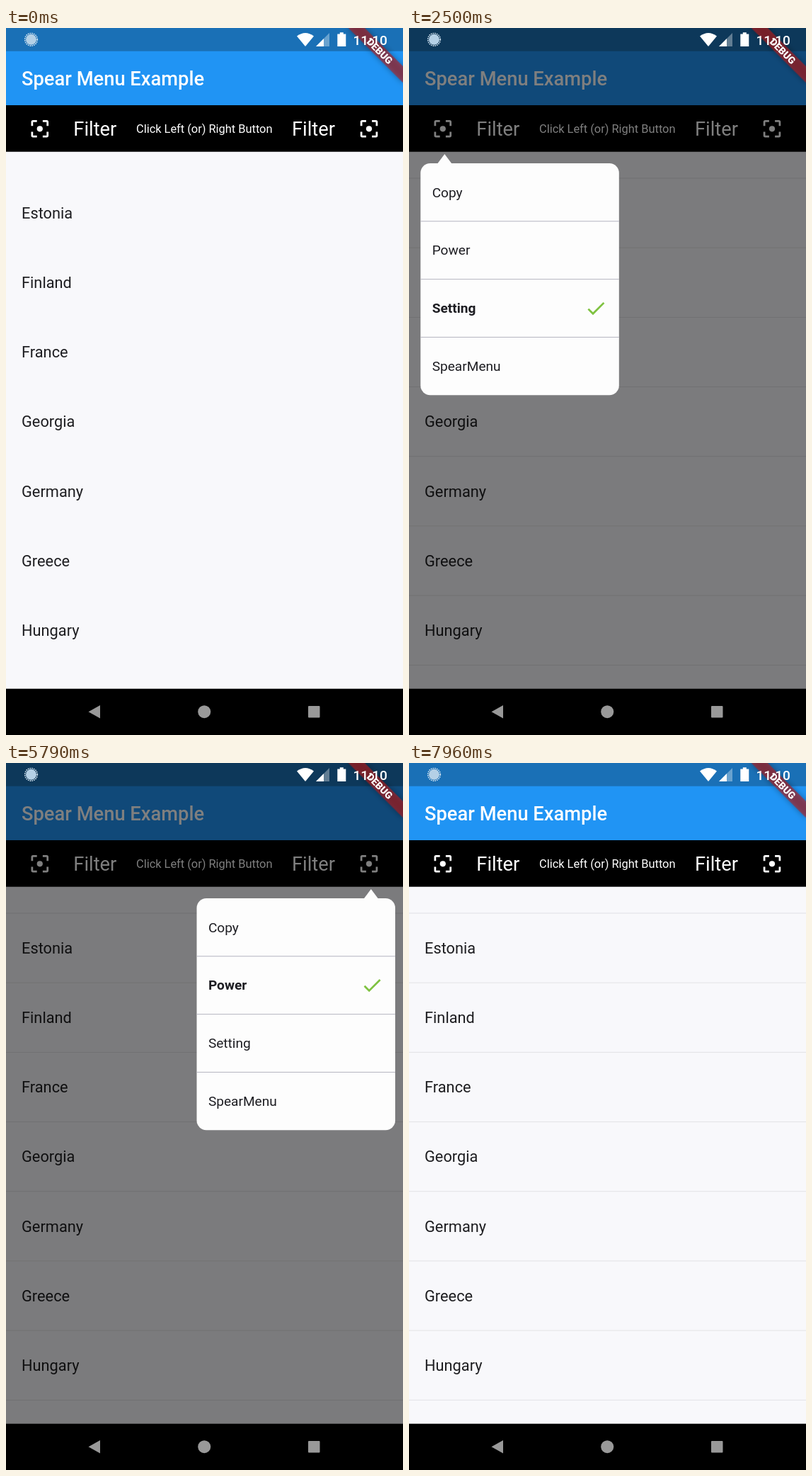
An HTML page for the animation above (8000 ms loop, 561 by 998 pixels).

```html
<!DOCTYPE html>
<html lang="en">
<head>
<meta charset="utf-8">
<title>Spear Menu Example</title>
<style>
  html, body { margin: 0; width: 100%; height: 100%; overflow: hidden; background: #000; }
  svg { display: block; width: 100%; height: 100%; font-family: Roboto, sans-serif; }
  .menu text { font-size: 19.1px; fill: #1d1d22; }
  .menu text.active { font-weight: 700; }
  .shadow { filter: drop-shadow(0 0 4px #0008); }
</style>
</head>
<body>
<svg id="stage" viewBox="0 0 561 998"></svg>
<script>
const LOOP = 8000;
const DP = 561 / 411.4;
const ROW = 60 * DP;

const countries = ['Estonia', 'Finland', 'France', 'Georgia', 'Germany', 'Greece', 'Hungary'];
const items = ['Copy', 'Power', 'Setting', 'SpearMenu'];

// Each menu is visible from `from` until `to`, with one item checked.
const menus = [
  { x: 16.3, arrow: 50.3, active: 2, from: 2100, to: 4340 },
  { x: 269.5, arrow: 515.8, active: 1, from: 4900, to: 6380 },
  { x: 269.5, arrow: 515.8, active: 3, from: 6710, to: 7900 },
];
const DIVIDERS_FROM = 420;

const rect = (x, y, w, h, fill, extra = '') =>
  `<rect x="${x}" y="${y}" width="${w}" height="${h}" fill="${fill}" ${extra}/>`;
const text = (x, y, size, fill, label, extra = '') =>
  `<text x="${x}" y="${y}" font-size="${size}" fill="${fill}" ${extra}>${label}</text>`;

const focusIcon = x => `
  <g transform="translate(${x - 12 * DP} ${142.3 - 12 * DP}) scale(${DP})">
    <path d="M4 9V5q0-1 1-1h4M15 4h4q1 0 1 1v4M20 15v4q0 1-1 1h-4M9 20H5q-1 0-1-1v-4"
      fill="none" stroke="#fff" stroke-width="2"/>
    <circle cx="12" cy="12" r="3" fill="#fff"/>
  </g>`;

const checkIcon = (x, y) =>
  `<path transform="translate(${x - 12 * DP} ${y - 12 * DP}) scale(${DP})" fill="#7fc241"
    d="M9 16.17 4.83 12l-1.42 1.41L9 19 21 7l-1.41-1.41z"/>`;

const app = `
  ${rect(0, 0, 561, 998, '#f8f8fb')}
  ${countries.map((name, i) => text(22, 268.9 + i * 72 * DP, 21.8, '#1e1e21', name)).join('')}
  <g id="dividers">
    ${[...Array(8).keys()].map(i => rect(0, 211.5 + i * 72 * DP, 561, 1, '#e2e2e5')).join('')}
  </g>
  ${rect(0, 0, 561, 109, '#2094f4')}
  ${rect(0, 0, 561, 32.7, '#1a70b6')}
  ${text(22, 81, 27.3, '#fff', 'Spear Menu Example', 'font-weight="500"')}
  ${rect(0, 109, 561, 65.7, '#000')}
  ${focusIcon(47.8)}${focusIcon(513)}
  ${text(95.3, 152.3, 27.3, '#fff', 'Filter')}
  ${text(404, 152.3, 27.3, '#fff', 'Filter')}
  ${text(184, 148, 16.4, '#fff', 'Click Left (or) Right Button')}`;

const menu = ({ x, arrow, active }) => `
  <g class="menu" visibility="hidden">
    <path d="M${arrow - 10.5} 192L${arrow} 178L${arrow + 10.5} 192z" fill="#fdfdfd"/>
    ${rect(x, 191, 280.5, 4 * ROW, '#fdfdfd', 'rx="13.6"')}
    ${items.map((name, i) => {
      const y = 191 + i * ROW;
      return (i ? rect(x, y - .5, 280.5, 1, '#b4b4c0') : '') +
        `<text x="${x + 16.4}" y="${y + 47.6}" class="${i === active ? 'active' : ''}">${name}</text>` +
        (i === active ? checkIcon(x + 247.8, y + 41) : '');
    }).join('')}
  </g>`;

const banner = `
  <g transform="translate(561 0) rotate(45)">
    ${rect(-54.6, 38.2, 109.2, 16.4, '#b71c1c', 'fill-opacity=".63" class="shadow"')}
    ${text(0, 51.3, 13.9, '#fff', 'DEBUG', 'font-weight="900" text-anchor="middle"')}
  </g>`;

const systemBars = `
  <circle cx="35.5" cy="16.3" r="7.5" fill="#b4d0e6"/>
  <circle cx="35.5" cy="16.3" r="8.8" fill="none" stroke="#d5e5f1" stroke-width="1.6" stroke-dasharray="1.6 1.2"/>
  <path d="M411 11.5Q423 2.5 435 11.5L423 26z" fill="#fff"/>
  <path d="M457 7V26H438z" fill="#fff" fill-opacity=".35"/>
  <path d="M449 15V26H438z" fill="#fff"/>
  <path d="M468.3 8.5h3.5v-2.2h5v2.2h3.5v17.5h-12z" fill="#fff"/>
  ${text(490.5, 23.6, 19.1, '#fff', '11:10', 'font-weight="500"')}
  ${rect(0, 932.7, 561, 65.3, '#000')}
  <path d="M116.5 965.3L133 956V974.5z" fill="#999"/>
  <circle cx="280.2" cy="965.2" r="9" fill="#999"/>
  ${rect(427, 957, 16.5, 16.5, '#999', 'rx="1"')}`;

const stage = document.getElementById('stage');
stage.innerHTML = app + rect(0, 0, 561, 933, '#000', 'fill-opacity=".5" id="dim"') +
  menus.map(menu).join('') + banner + systemBars;

const dim = document.getElementById('dim');
const dividers = document.getElementById('dividers');
const menuNodes = [...stage.querySelectorAll('.menu')];
const show = (node, on) => node.setAttribute('visibility', on ? 'visible' : 'hidden');

function draw(now) {
  const t = now % LOOP;
  const open = menus.findIndex(m => t >= m.from && t < m.to);
  menuNodes.forEach((node, i) => show(node, i === open));
  show(dim, open >= 0);
  show(dividers, t >= DIVIDERS_FROM);
}

const start = performance.now();
function tick() {
  draw(performance.now() - start);
  requestAnimationFrame(tick);
}
tick();
</script>
</body>
</html>
```
